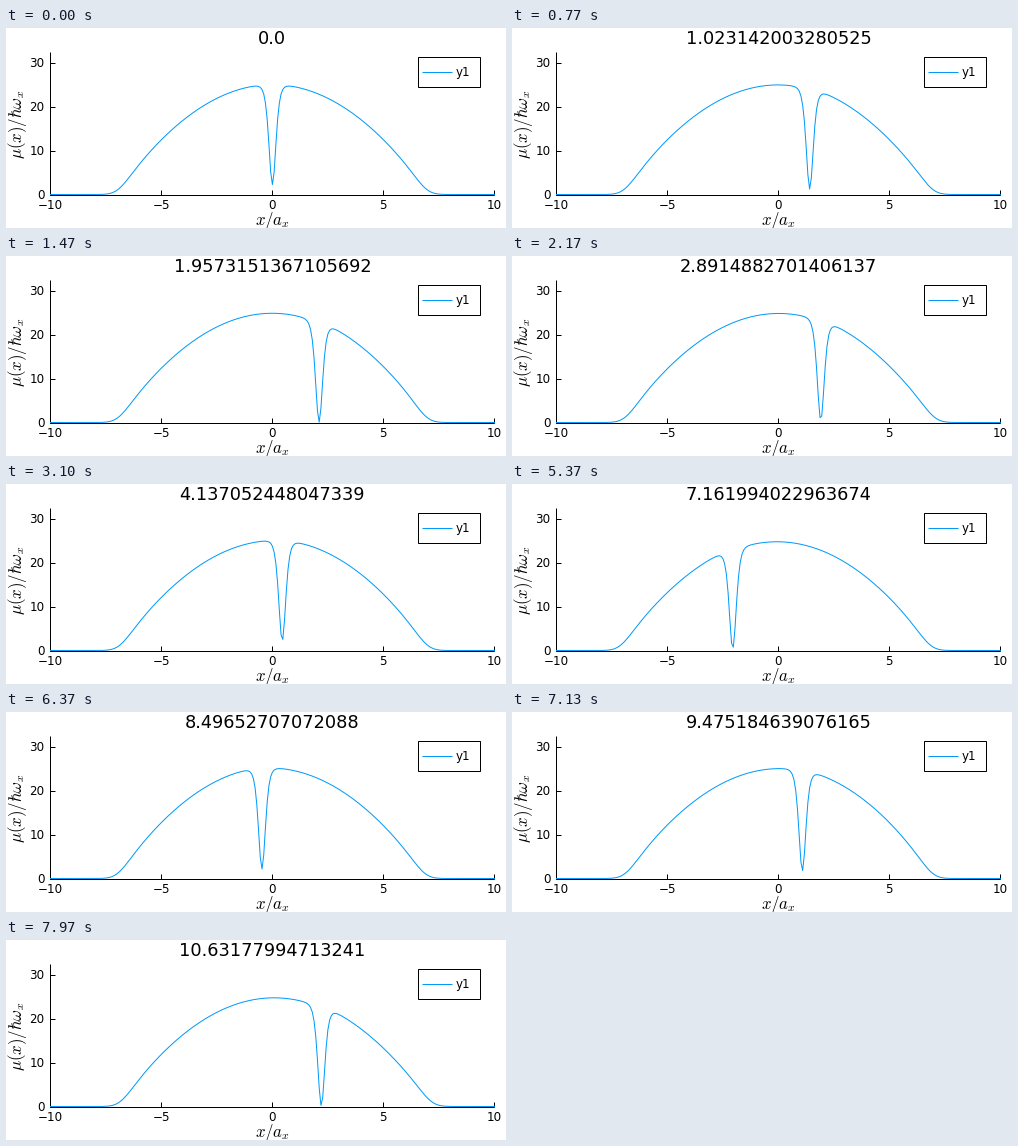
A matplotlib script that plays this animation: 500x200 px, repeating every 8 s.

```python
import numpy as np
import matplotlib.pyplot as plt
from matplotlib.animation import FuncAnimation
from matplotlib.patches import Rectangle

W, H, DPI = 500, 200, 100
FRAMES, LOOP_MS = 240, 8000
BLUE = "#009afa"
MU = 25.0
T_END, T_STEPS = 8 * np.pi * np.sqrt(2), 799

plt.rcParams["font.family"] = "DejaVu Sans"
plt.rcParams["mathtext.fontset"] = "cm"


# Dark soliton in a harmonic trap: Gross-Pitaevskii equation, split-step Fourier
N, L = 512, 40.0
x = (np.arange(N) - N // 2) * L / N
k = 2 * np.pi * np.fft.fftfreq(N, L / N)
V = 0.5 * x**2


def evolve(psi, dt, steps):
    """Strang splitting; an imaginary dt relaxes towards the ground state."""
    kin = np.exp(-0.5j * k**2 * dt)
    for _ in range(steps):
        psi = psi * np.exp(-0.5j * dt * (V + abs(psi)**2 - MU))
        psi = np.fft.ifft(kin * np.fft.fft(psi))
        psi = psi * np.exp(-0.5j * dt * (V + abs(psi)**2 - MU))
    return psi


def soliton_densities(substeps=40):
    ground = evolve(np.sqrt(np.maximum(MU - V, 0)) + 0j, -0.002j, 3000)
    v = 0.3
    f = np.sqrt(1 - v**2)
    psi = ground * (f * np.tanh(f * x * np.sqrt(MU)) + 1j * v)
    dt = T_END / T_STEPS / substeps
    out = []
    for _ in range(FRAMES):
        out.append(abs(psi)**2)
        psi = evolve(psi, dt, substeps)
    return out


density = soliton_densities()
view = abs(x) <= 10


# Stage in pixel coordinates, y downwards
def px(u):
    return 266.4 + 22.19 * u


def py(u):
    return 166.5 - 4.4 * u


fig = plt.figure(figsize=(W / DPI, H / DPI), dpi=DPI, facecolor="white")
ax = fig.add_axes([0, 0, 1, 1])
ax.set_xlim(0, W)
ax.set_ylim(H, 0)
ax.axis("off")


def line(xs, ys, color="black", width=1.0, **kw):
    return ax.plot(xs, ys, color=color, lw=width * 72 / DPI, **kw)[0]


def text(cx, base, s, size, ha="center", **kw):
    return ax.text(cx, base, s, fontsize=size * 72 / DPI, ha=ha,
                   va="baseline", **kw)


TICK, LABEL, TITLE = 11.87, 16.8, 17.8

line([px(-10), px(10)], [py(0)] * 2, solid_capstyle="butt")
line([px(-10)] * 2, [py(0), py(32.5)], solid_capstyle="butt")
for u in (-10, -5, 0, 5, 10):
    line([px(u)] * 2, [py(0), py(1)], solid_capstyle="butt")
    text(px(u), 181.3, str(u).replace("-", "\u2212"), TICK)
for u in (0, 10, 20, 30):
    line([px(-10), px(-10) + 4.4], [py(u)] * 2, solid_capstyle="butt")
    text(38.6, py(u) + 4.4, str(u), TICK, ha="right")

text(px(0), 197, r"$x/a_x$", LABEL)
text(16.3, 96, r"$\mu(x)/h\omega_x$", LABEL, rotation=90,
     rotation_mode="anchor")
line([7.0, 5.8], [88.4, 83.6], width=0.8)  # bar of h-bar

curve = line([], [], BLUE, zorder=3)

ax.add_patch(Rectangle((411.5, 28.5), 62, 30, fc="white", ec="black",
                       lw=72 / DPI, zorder=4))
line([416, 445.5], [43.5, 43.5], BLUE, zorder=5, solid_capstyle="butt")
text(450, 47.8, "y1", TICK, ha="left", zorder=5)

title = text(px(0), 15.7, "0.0", TITLE)


def draw(i):
    curve.set_data(px(x[view]), py(density[i][view]))
    t = float(np.longdouble(i) * np.longdouble(T_END) / T_STEPS)
    title.set_text(repr(t))
    return curve, title


anim = FuncAnimation(fig, draw, frames=FRAMES, interval=LOOP_MS / FRAMES,
                     init_func=lambda: draw(0), repeat=True, repeat_delay=0)
plt.show()
```
